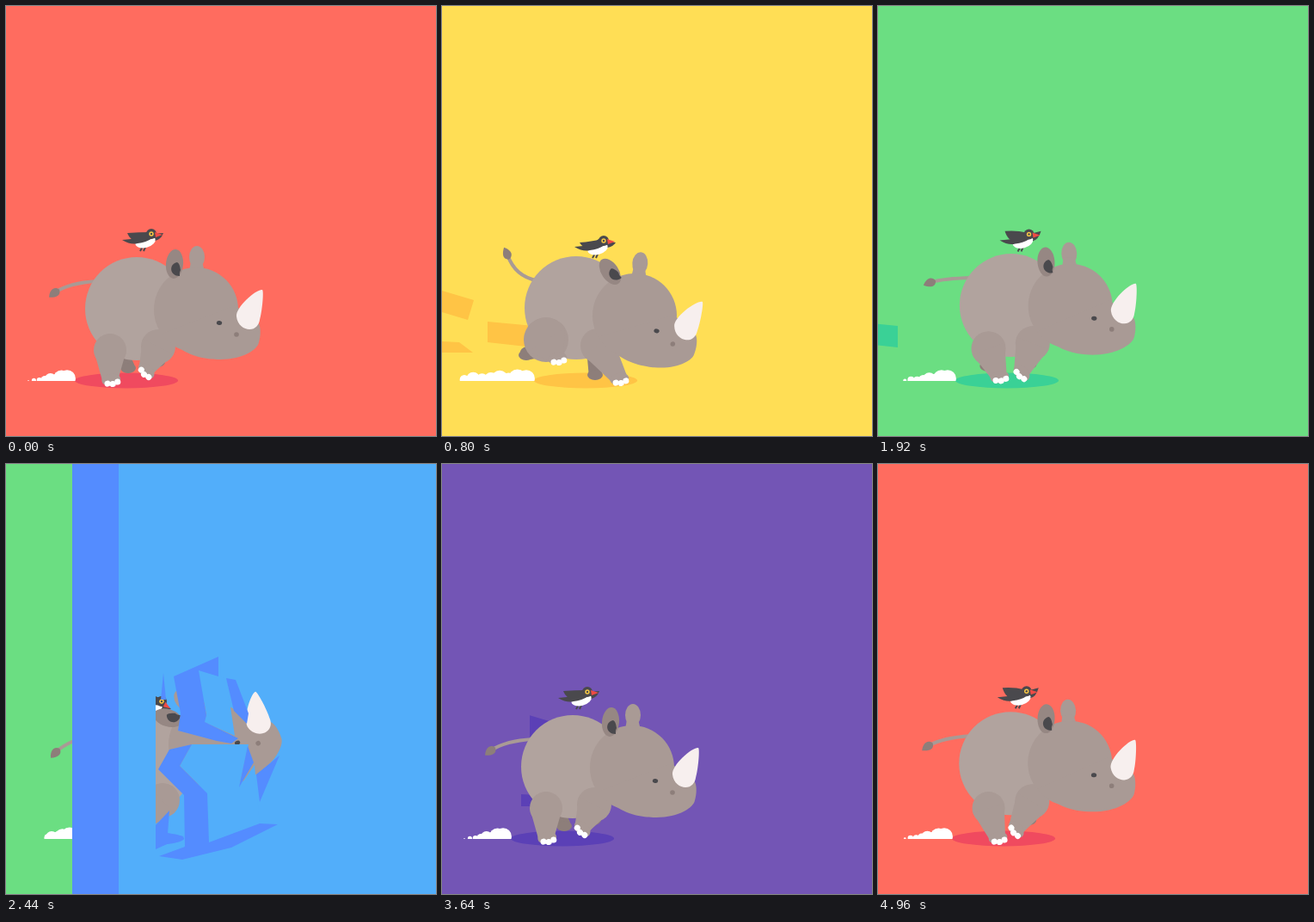
These frames come from a looping animation (500 by 500 pixels, 5 s). An HTML page with a canvas:

```html
<!DOCTYPE html>
<html lang="en">
<head>
<meta charset="utf-8">
<title>Charging rhino</title>
<style>
  html, body { margin: 0; width: 100%; height: 100%; overflow: hidden; }
  canvas { display: block; width: 500px; height: 500px; }
</style>
</head>
<body>
<canvas width="500" height="500"></canvas>
<script>
const ctx = document.querySelector('canvas').getContext('2d');
const BEAT = 1000, STEP = 40, HIT = 440, GROUND = 436;
const rooms = [['#ff6c5f', '#f04a5f'], ['#ffde55', '#ffc445'], ['#6bde82', '#3ad196'],
  ['#52aefa', '#548cff'], ['#7355b5', '#5b40b6']];
const SKIN = '#a99a95', BODY = '#b1a39e', FAR = '#8d7e7a', EAR = '#968783',
  INK = '#4a494d', WHITE = '#fff', HORN = '#f7efee';

function ellipse(x, y, rx, ry, color, deg = 0) {
  ctx.fillStyle = color;
  ctx.beginPath();
  ctx.ellipse(x, y, rx, ry, deg * Math.PI / 180, 0, 7);
  ctx.fill();
}
const circle = (x, y, r, color) => ellipse(x, y, r, r, color);

function shape(d, color) {
  ctx.fillStyle = color;
  ctx.fill(new Path2D(d));
}

function line(d, width, color) {
  ctx.strokeStyle = color;
  ctx.lineWidth = width;
  ctx.stroke(new Path2D(d));
}

function at(x, y, deg, draw) {
  ctx.save();
  ctx.translate(x, y);
  ctx.rotate(deg * Math.PI / 180);
  draw();
  ctx.restore();
}

function clipped(x, width, height, draw) {
  if (width <= 0) return;
  ctx.save();
  ctx.beginPath();
  ctx.rect(x, 0, width, height);
  ctx.clip();
  draw();
  ctx.restore();
}

// Tapered limb between two round joints.
function limb(x1, y1, r1, x2, y2, r2, color) {
  const a = Math.atan2(y2 - y1, x2 - x1) + Math.PI / 2, c = Math.cos(a), s = Math.sin(a);
  circle(x1, y1, r1, color);
  circle(x2, y2, r2, color);
  shape(`M${x1 + c * r1} ${y1 + s * r1}L${x2 + c * r2} ${y2 + s * r2}
    L${x2 - c * r2} ${y2 - s * r2}L${x1 - c * r1} ${y1 - s * r1}Z`, color);
}

function nearLeg(x, y, r, dx, dy, deg) {
  limb(x, y, r, x + dx, y + dy - 1, 10, SKIN);
  at(x + dx, y + dy, deg, () => {
    ellipse(1, 2, 11, 7, SKIN);
    for (let i = -1; i < 2; i++) circle(2 + i * 6, 7 - Math.abs(i) * 1.5, 3.5, WHITE);
  });
}

function farLeg(x, y, footX, footY) {
  limb(x, y, 11, footX, footY, 7.5, FAR);
  ellipse(footX, footY + 2, 9, 6, FAR);
}

function drawDust(right, length, tail) {
  clipped(0, 500, GROUND, () => {
    for (let i = 0; i < 8; i++) {
      const u = i / 7, r = (11 + (tail - 11) * u) * (0.9 + 0.15 * Math.sin(i * 2.4));
      circle(right - 9 - (length - 9 - tail) * u, GROUND - r * 0.3, r, WHITE);
    }
  });
}

function drawTail(x, y, tipX, tipY) {
  const bendX = (x + tipX) / 2 - 8, bendY = (y + tipY) / 2 - (tipY - y) * 0.35;
  line(`M${x} ${y}Q${bendX} ${bendY} ${tipX} ${tipY}`, 4, SKIN);
  at(tipX, tipY, Math.atan2(tipY - bendY, tipX - bendX) * 180 / Math.PI, () =>
    shape('M-6 0C-4-7 2-6 9-1C3 7-4 6-6 0Z', FAR));
}

function drawBird(x, y, deg, wing) {
  at(x, y, deg, () => {
    line('M-9 13L-13 20M-6 13L-9 20', 2, INK);
    shape(`M-1 0L14 ${wing}Q11 7 4 8Z`, INK);
    ellipse(-7, 9, 12, 7, WHITE, -15);
    shape('M6 0Q2-7-6-2L-14 5L-34 7Q-24 13-16 11Q-6 10 1 5Z', INK);
    shape(`M-3-2Q-14 ${wing - 1}-28 ${wing}Q-24 10-12 9Q-3 7-3-2Z`, INK);
    circle(0, 0, 6, INK);
    shape('M4-2L13 1L5 4Z', '#ef4b45');
    circle(0, 0, 2.7, '#f7c844');
    circle(0, 0, 1.2, INK);
  });
}

function drawHead(x, y, deg, earSwing, earFold) {
  at(x, y, deg, () => {
    circle(0, 0, 49, SKIN);
    shape('M-40 28Q-30 42-16 47C0 57 20 58 28 58C55 58 72 46 73 38C75 32 76 20 72 15L45-5Z', SKIN);
    shape('M77-23C70-24 46-3 47 8C48 18 56 23 62 23C69 23 73 18 74 12C77 2 79-22 77-23Z', HORN);
    ellipse(27, 15.5, 3.2, 2.5, INK, 10);
    circle(47, 29, 2.8, FAR);
    at(0, 0, earSwing, () => at(-25, -53, earFold, () => {
      ellipse(0, 0, 10, 17, EAR, 5);
      shape('M3-2C-7 0-6 14 6 14Q5 10 7 7Q6-1 3-2Z', INK);
    }));
  });
}

// Soft pulse: 1 at the centre, 0 beyond the reach.
const pulse = (t, centre, reach) =>
  Math.cos(Math.min(1, Math.abs(t - centre) / reach) * Math.PI / 2) ** 2;

function drawRhino(t, shade) {
  const crouch = pulse(t, 240, 200), lunge = pulse(t, HIT, 200),
    stretch = pulse(t, 800, 160), hop = pulse(t, 940, 60);
  // A resting value plus its change in each phase of the charge.
  const mix = (rest, c, l, s, h) => rest + c * crouch + l * lunge + s * stretch + h * hop;

  const x = mix(152, -26, 5, 4, 3), y = mix(352, -2, -5, -1, -5);
  const headX = mix(221, -38, 17, 3, 3), headY = mix(353, 15, -27, 7, -7);
  const tilt = mix(0, 29, -33, 5, -4);
  const hipX = x + mix(-31, -10, 0, -4, 7), hipY = y + mix(48, -9, 0, -11, 5);
  const hindX = mix(0, -16, -20, 12, 13), hindY = mix(33, -5, -3, -13, 0);
  const foreX = mix(-13, 36, -17, 37, -6), foreY = mix(26, 5, 4, 11, 6);
  const shadowX = mix(140, -15, 7, 27, 8);

  ellipse(shadowX, 435.5, 60, 9, shade);
  drawDust(shadowX - 60, mix(55, -23, -11, 33, 2), mix(1, 7, 5, 6, 1));
  drawTail(x - 46, y - 32, x + mix(-95, 3, -4, 15, -1), y + mix(-19, -22, 7, -43, -2));
  farLeg(x - 25, y + 45, x + mix(-10, -42, -25, -48, -14), y + mix(67, -7, 0, -14, 5));
  farLeg(x + 23, y + 48, x + mix(24, 18, -20, -2, -4), y + mix(60, 17, 0, 16, 5));
  at(headX, headY, tilt, () => {
    ellipse(1, -61, 9, 13, SKIN);
    shape('M-6-56L-8-44L10-44L7-56Z', SKIN);
  });
  circle(x, y, 60, BODY);
  drawBird(x + mix(17, 13, 7, 15, 2), y + mix(-87, 5, 16, 9, 4), 35 * lunge, mix(-1, -6, 2, 3, -4));
  nearLeg(hipX, hipY, 19 + 7 * stretch, hindX, hindY, Math.max(0, -3.8 * hindX) - 10);
  nearLeg(x + 25, y + 44, 20, foreX, foreY, 25 - 1.5 * foreX);
  drawHead(headX, headY, tilt, -9 * (crouch + stretch), -45 * lunge - 35 * stretch);
}

// The wall cracks open: two face pieces and the dark sides behind them.
const faces = ['M224 240L256 249L266 316L230 300L233 292Z',
  'M216 326H282L271 376L289 350L295 420L236 440L234 383L202 351Z'];
const sides = ['M195 247L247 224V247L224 240L233 292L231 300L270 319L262 325L245 322L200 310L203 290Z',
  'M256 249L267 251L282 290L280 302L265 287Z',
  'M190 332L216 326L202 351L234 383L236 440L295 418L316 419L262 446L205 460L178 456L208 445L207 385L177 355Z',
  'M318 339L295 393L291 361Z', 'M281 328L271 376L288 347Z',
  'M174 448V420L190 403L188 430L207 433Z', 'M183 243L186 274H180Z'];
const rubble = ['M-10 328L37 342L30 365L-10 353Z', 'M53 367L107 372V397L53 391Z',
  'M-20 389L20 391L36 403H-20Z'];

function drawBurst(t, face, shade) {
  const opened = Math.min(1, (t - HIT) / 60 + 1), after = Math.max(0, t - HIT);
  const scale = opened * (1 - after / 200);
  if (opened <= 0 || scale <= 0) return;
  [...faces, ...sides].forEach((d, i) =>
    at(300 - after * 1.2, 330 + Math.sin(i * 2) * after * 0.6, -after / 4, () => {
      ctx.scale(scale, scale);
      ctx.translate(-300, -330);
      shape(d, i < faces.length ? face : shade);
    }));
}

function drawRubble(t, shade) {
  if (t < HIT + STEP) return;
  const left = 800 - t;
  rubble.forEach((d, i) =>
    at(left * 0.7, -(Math.max(0, left) ** 2) * (0.0014 - i * 0.0006), 0, () => shape(d, shade)));
}

function draw(time) {
  const t = time % BEAT, i = Math.floor(time / BEAT) % rooms.length;
  const [face, shade] = rooms[i], [nextFace, nextShade] = rooms[(i + 1) % rooms.length];
  const edge = 77 - 2.5 * (t - HIT), opening = Math.max(0, edge + 97);

  ctx.fillStyle = face;
  ctx.fillRect(0, 0, 500, 500);
  clipped(0, edge, 500, () => drawRhino(t, shade));
  if (edge >= 500) return;

  ctx.fillStyle = nextFace;
  ctx.fillRect(Math.max(0, edge), 0, 500, 500);
  ctx.fillStyle = nextShade;
  ctx.fillRect(edge, 0, 54, 500);
  drawRubble(t, nextShade);
  clipped(opening, 500 - opening, 500, () => drawRhino(t, nextShade));
  drawBurst(t, nextFace, nextShade);
}

function frame() {
  const now = performance.now() % (BEAT * rooms.length);
  draw(Math.floor(now / STEP) * STEP);
  requestAnimationFrame(frame);
}
frame();
</script>
</body>
</html>
```
